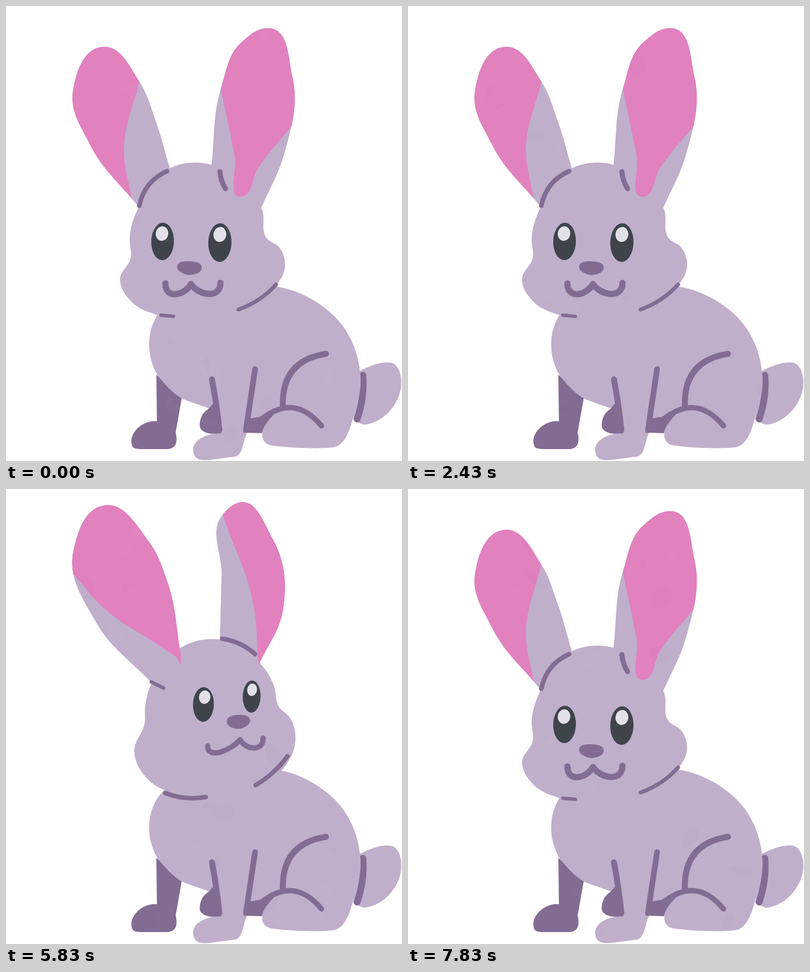
Write an HTML page with a canvas that moves like this. It is 698 px wide and 802 px high and loops after 7910 ms.

```html
<!DOCTYPE html>
<html lang="en">
<head>
<meta charset="utf-8">
<title>Rabbit</title>
<style>
html, body { margin: 0; width: 100%; height: 100%; overflow: hidden; background: #fff; }
canvas { display: block; }
</style>
</head>
<body>
<canvas id="stage" width="698" height="802"></canvas>
<script>
const ctx = document.getElementById('stage').getContext('2d');
const W = 698, H = 802, LOOP = 7910;
const LILAC = '#bfafcb', DARK = '#836c92', PINK = '#e181be', EYE = '#3f444b', SHINE = '#e2e1ea';

const points = s => s.split(/[ ,]+/).map(Number);
const blend = (a, b, k) => a.map((v, i) => v + (b[i] - v) * k);
const mix = (a, b, k) => Object.fromEntries(Object.keys(a).map(n => [n, blend(a[n], b[n], k)]));

// Bows: width, two ends, rise of the middle. Eyes: centre, radii, shift of the shine.
// Mouth: width, left, middle and right point, sag.
const front = {
  head: points('333,276 415,311 451,358 460,410 481,425 492,455 474,496 390,541 268,545 220,520 201,483 220,443 218,408 235,352 285,288'),
  chinL: [6, 273, 545, 295, 547, 0],
  chinR: [7, 410, 535, 476, 491, -5],
  eyeL: [276, 415, 20, 33, -1],
  eyeR: [377, 417, 20.5, 34, 0],
  nose: points('302,457 323,450 345,460 324,474'),
  mouth: [11, 281, 489, 326, 490, 378, 488, 29]
};
const lifted = {
  head: points('385,260 455,298 480,338 491,374 509,394 518,435 500,485 420,525 330,537 262,507 237,455 255,399 257,372 265,340 320,275'),
  chinL: [7.5, 268, 516, 348, 537, -2],
  chinR: [9, 442, 518, 506, 479, 0],
  eyeL: [366, 371, 18, 30, 3],
  eyeR: [447, 353, 14.5, 27, 1],
  nose: points('411,397 432,385 451,392 432,410'),
  mouth: [9, 374, 444, 434, 430, 472, 427, 24]
};
const turned = {
  ...mix(lifted, front, .2),
  head: blend(lifted.head, front.head, .3),
  chinL: [8, 281, 536, 352, 543, -5],
  chinR: [8, 440, 522, 496, 471, -4]
};

// An ear: outline from base over the tip to base, edge of the pink, bow at the base.
const ear = (outline, edge, bow) => ({ outline: points(outline), edge: points(edge), bow });
const calm = [
  ear('233,353 149,246 118,150 170,72 235,133 263,200 289,287', '222,342 208,255 236,130', [8, 284, 291, 235, 352, -10]),
  ear('362,282 379,145 415,64 464,39 505,125 490,262 449,358', '379,148 403,265 415,336 444,286 504,211', [9, 377, 292, 387, 322, -2])
];
const bent = [
  ear('268,346 130,264 54,150 113,99 220,150 268,205 321,278', '52,148 165,247 320,312', [8, 267, 341, 295, 350, 0]),
  ear('358,262 315,170 325,62 380,20 440,88 453,200 444,286', '312,124 395,203 444,286', [9, 361, 260, 438, 283, 10])
];
const swept = [
  ear('263,347 133,290 34,165 90,95 190,155 240,217 289,300', '133,291 240,289 290,303', [8, 268, 347, 292, 346, 1]),
  ear('360,262 301,155 296,60 337,0 400,90 440,215 442,277', '298,150 380,219 441,278', [8, 362, 255, 411, 263, 8])
];
const upright = [
  ear('258,343 160,237 119,108 172,29 250,90 285,165 308,290', '121,152 165,203 270,276 300,296', [6, 256, 340, 278, 351, 0]),
  ear('377,264 380,150 382,45 410,24 470,88 488,215 446,309', '384,52 436,203 445,309', [8, 381, 264, 439, 291, 5])
];
const flung = [
  ear('236,344 125,304 28,172 52,138 165,196 220,241 268,297', '233,346 185,250 166,195', [10, 264, 296, 237, 339, -2]),
  ear('340,283 297,180 300,82 350,37 410,125 431,235 434,343', '299,188 370,292 400,307 408,270 422,178', [8, 342, 287, 370, 312, 0])
];

const pose = (face, ears, tilt = 0) => ({ face, ears, tilt });
const rest = pose(front, calm);
const rise = [
  pose(mix(front, lifted, .3), flung, .25),
  pose(mix(front, lifted, .7), flung, -.15),
  pose(lifted, swept),
  pose(turned, upright)
];
const fall = [
  pose(lifted, bent),
  pose(mix(lifted, front, .3), swept),
  pose(mix(lifted, front, .75), flung, .1),
  pose(front, flung),
  rest
];
const cues = [[0, rest]];
const cue = (times, poses) => times.forEach((t, i) => cues.push([t, poses[i]]));
cue([130, 230, 330, 470], rise);
cue([2000, 2100, 2200, 2330, 2430], fall);
cue([4100, 4200, 4300, 4400], rise);
cue([5970, 6070, 6170, 6300, 6400], fall);

// Smooth path through points; tangents lean to the nearer neighbour.
function curve(p, closed) {
  const n = p.length / 2, path = new Path2D();
  const at = i => {
    const j = closed ? (i + n) % n : Math.max(0, Math.min(n - 1, i));
    return [p[2 * j], p[2 * j + 1]];
  };
  const span = (a, b) => Math.hypot(b[0] - a[0], b[1] - a[1]) || 1;
  const slope = i => {
    const a = at(i - 1), b = at(i), c = at(i + 1);
    const u = span(a, b) ** 2, v = span(b, c) ** 2;
    const d = [0, 1].map(k => (b[k] - a[k]) / u + (c[k] - b[k]) / v);
    const len = Math.hypot(...d) || 1;
    return d.map(x => x / len);
  };
  path.moveTo(p[0], p[1]);
  for (let i = 0; i < (closed ? n : n - 1); i++) {
    const a = at(i), b = at(i + 1), u = slope(i), v = slope(i + 1), h = span(a, b) * .36;
    path.bezierCurveTo(a[0] + u[0] * h, a[1] + u[1] * h, b[0] - v[0] * h, b[1] - v[1] * h, ...b);
  }
  return path;
}

function fill(path, color) {
  ctx.fillStyle = color;
  ctx.fill(path);
}

function stroke(path, width) {
  ctx.strokeStyle = DARK;
  ctx.lineWidth = width;
  ctx.stroke(path);
}

function bow([width, x, y, x2, y2, rise]) {
  const dx = x2 - x, dy = y2 - y, k = 2 * rise / Math.hypot(dx, dy);
  const path = new Path2D();
  path.moveTo(x, y);
  path.quadraticCurveTo((x + x2) / 2 + dy * k, (y + y2) / 2 - dx * k, x2, y2);
  stroke(path, width);
}

function oval(x, y, rx, ry, color, angle = 0) {
  const path = new Path2D();
  path.ellipse(x, y, rx, ry, angle, 0, 7);
  fill(path, color);
}

function drawBody() {
  const part = (d, color) => fill(new Path2D(d), color);
  part('M265 650 L266 732 C245 729 222 747 221 766 C221 780 227 781 240 781 L285 781 C300 780 303 768 299 752 L310 690 Z', DARK);
  part('M620 645 C645 632 665 626 680 629 C694 634 699 655 696 675 C690 705 665 735 630 738 L612 730 Z', LILAC);
  bow([12, 629, 651, 619, 728, 4]);
  part('M290 522 C248 549 242 610 268 652 C285 673 300 689 320 696 L360 710 L376 752 C345 756 328 768 330 785 C333 802 345 801 360 800 L405 794 C418 790 418 765 425 752 L452 752 C450 768 460 774 472 775 C500 779 550 781 575 778 C595 776 604 755 612 725 C620 700 628 675 624 645 C620 605 603 570 577 545 C545 515 505 497 470 494 L440 450 L300 480 Z', LILAC);
  part('M356 711 C343 718 339 738 343 745 C352 756 365 754 380 753 L366 700 Z', DARK);
  part('M418 752 L451 753 C453 742 460 733 472 720 L424 728 Z', DARK);
  bow([10.5, 363, 658, 376, 747, 1]);
  bow([10, 439, 640, 423, 747, 0]);
  bow([10.5, 564, 613, 488, 704, -26]);
  bow([9.5, 448, 730, 556, 740, 27]);
}

function drawEar({ outline, edge }, tilt) {
  const [ax, ay] = outline, [bx, by] = outline.slice(-2), [tx, ty] = outline.slice(6, 8);
  const mx = (ax + bx) / 2, my = (ay + by) / 2;
  const cx = (mx + tx) / 2, cy = (my + ty) / 2;
  const turn = (x, y) => Math.atan2(y - cy, x - cx);
  const shape = curve(outline);
  shape.lineTo(mx + (mx - tx) / 4, my + (my - ty) / 4);
  const pink = curve(edge);
  pink.arc(cx, cy, 500, turn(...edge.slice(-2)), turn(edge[0], edge[1]), true);
  pink.closePath();
  const tilted = draw => {
    ctx.save();
    ctx.translate(mx, my);
    ctx.rotate(tilt);
    ctx.translate(-mx, -my);
    draw();
    ctx.restore();
  };
  tilted(() => fill(shape, LILAC));
  return () => tilted(() => {
    ctx.clip(shape);
    fill(pink, PINK);
  });
}

function drawEye([x, y, rx, ry, shift]) {
  oval(x, y, rx, ry, EYE, .03);
  oval(x + shift, y - ry * .42, rx * .55, ry * .39, SHINE, .15);
}

function drawMouth([width, x0, y0, xm, ym, x1, y1, sag]) {
  const path = new Path2D();
  path.moveTo(x0, y0);
  path.bezierCurveTo(x0, y0 + sag, xm - (xm - x0) / 4, ym + sag * .7, xm, ym);
  path.bezierCurveTo(xm + (x1 - xm) / 4, ym + sag * .7, x1, y1 + sag, x1, y1);
  stroke(path, width);
}

function drawHead({ face, ears, tilt }) {
  const linings = ears.map(e => drawEar(e, tilt));
  fill(curve(face.head, true), LILAC);
  linings.forEach(paint => paint());
  [ears[0].bow, ears[1].bow, face.chinL, face.chinR].forEach(bow);
  drawEye(face.eyeL);
  drawEye(face.eyeR);
  fill(curve(face.nose, true), DARK);
  drawMouth(face.mouth);
}

// Faint paper mottling, reseeded on each step.
function drawGrain(step) {
  let seed = step * 7919 + 17;
  const rnd = () => (seed = (seed * 16807) % 2147483647) / 2147483647;
  ctx.save();
  ctx.globalCompositeOperation = 'source-atop';
  for (let i = 0; i < 50; i++) {
    const r = 6 + rnd() * 20, color = i % 2 ? 'rgba(70,40,90,.012)' : 'rgba(255,255,255,.015)';
    oval(rnd() * W, rnd() * H, r, r * (.3 + rnd() * .4), color, rnd() * 3);
  }
  ctx.restore();
}

ctx.lineCap = ctx.lineJoin = 'round';
const start = performance.now();

function frame() {
  const t = Math.max(0, performance.now() - start) % LOOP;
  const now = cues.filter(c => c[0] <= t).pop()[1];
  ctx.clearRect(0, 0, W, H);
  drawBody();
  drawHead(now);
  drawGrain(Math.floor((t + 630) / 110));
  requestAnimationFrame(frame);
}
frame();
</script>
</body>
</html>
```
